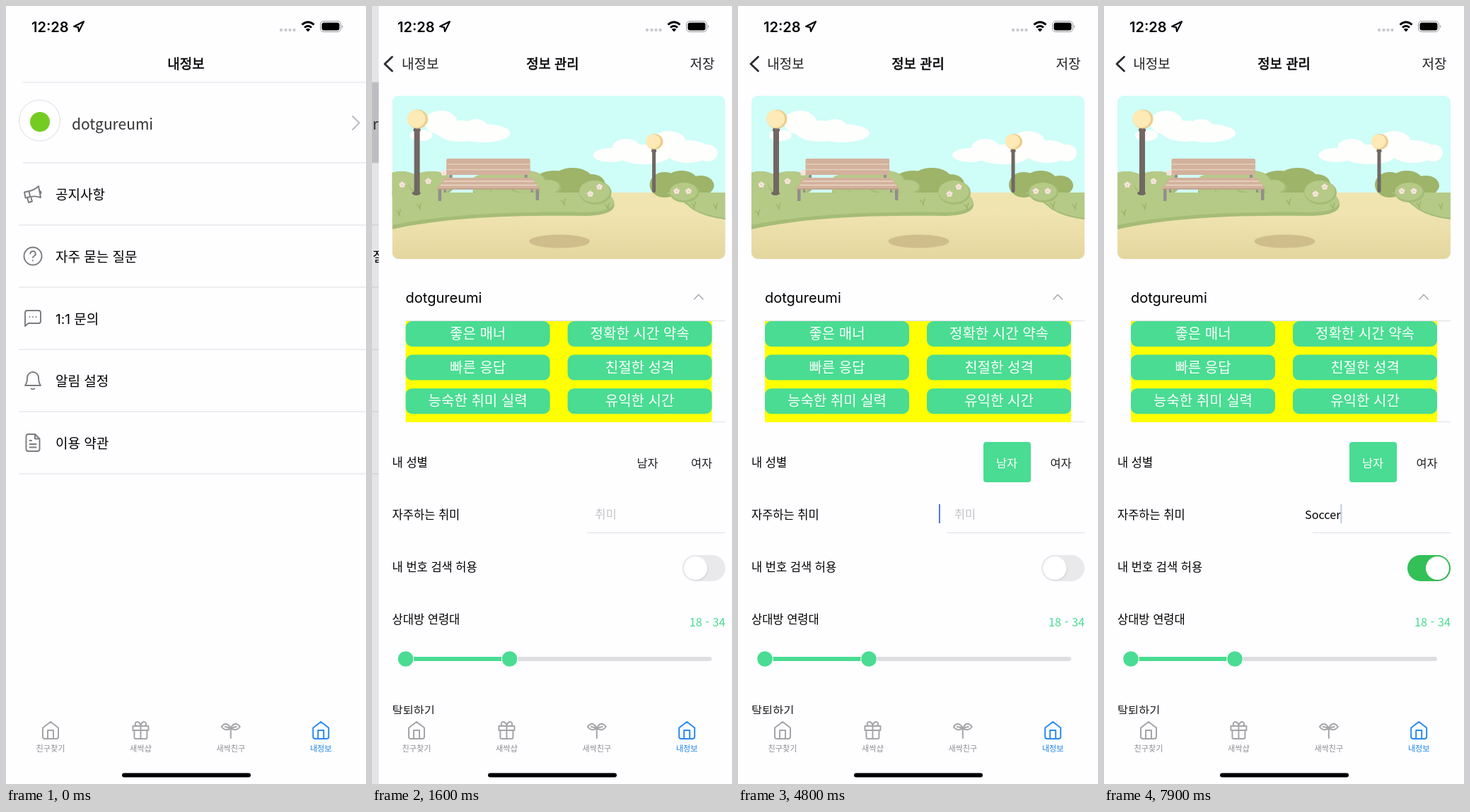
An HTML page for the animation above (8 s loop, 509x1101 px).

```html
<!DOCTYPE html>
<html lang="ko">
<head>
<meta charset="utf-8">
<title>내정보</title>
<style>
  html, body { margin: 0; width: 100%; height: 100%; overflow: hidden; background: #fefdff; }
  svg { display: block; width: 509px; height: 1101px; }
  text { font-family: "Noto Sans CJK KR", "Noto Sans CJK", "Noto Sans", sans-serif; white-space: pre; }
  .latin { font-family: Inter, "Noto Sans CJK KR", "Noto Sans CJK", sans-serif; }
  .medium { stroke: currentColor; stroke-width: .55px; }
  .line { fill: none; stroke-linecap: round; stroke-linejoin: round; }
</style>
</head>
<body>
<svg id="stage" viewBox="0 0 509 1101"></svg>
<script>
const LOOP = 8000, STEP = 100, WIDTH = 509;
const BG = '#fefdff', GREEN = '#49dc92', RULE = '#dfdee2';
const USER = 'dotgureumi';

// Text is placed by its vertical centre.
const text = (x, cy, str, size, attrs = '') =>
  `<text x="${x}" y="${cy + size * 0.38}" font-size="${size}" ${attrs}>${str}</text>`;
const rect = (x, y, w, h, fill, r = 0, attrs = '') =>
  `<rect x="${x}" y="${y}" width="${w}" height="${h}" rx="${r}" fill="${fill}" ${attrs}/>`;
const oval = (x, y, rx, ry, fill) => `<ellipse cx="${x}" cy="${y}" rx="${rx}" ry="${ry}" fill="${fill}"/>`;
const ovals = (fill, list) => list.map(o => oval(...o, fill)).join('');
const line = (d, stroke, width, attrs = '') =>
  `<path class="line" d="${d}" stroke="${stroke}" stroke-width="${width}" ${attrs}/>`;
const rule = (x1, x2, y) => `<path d="M${x1} ${y}H${x2}" stroke="${RULE}" stroke-width="1.2"/>`;
const icon = (x, y, d, stroke = '#7c7b80', width = 1.9) =>
  line(d, stroke, width, `transform="translate(${x} ${y})"`);
const MID = 'text-anchor="middle"';

const ICONS = {
  horn: 'M-12-2.5-5.5-4C0-5 4-7 8-11L11 5C6 3 1 3-4 4L-10.5 5.5ZM-5.5-4-4 4M-8 5-6 12-1 10.5-3 4M9.5-4.5Q13-3 10.5 0',
  ask: 'M-12.5 0a12.5 12.5 0 1 0 25 0a12.5 12.5 0 1 0-25 0M-3.6-3.4A3.7 3.7 0 1 1 1.6 0Q0 .8 0 2M0 6V6.2',
  chat: 'M-11 11V-8a3 3 0 0 1 3-3H8a3 3 0 0 1 3 3V4a3 3 0 0 1-3 3H-6.5ZM-4.5-2V-1.9M0-2V-1.9M4.5-2V-1.9',
  bell: 'M-11 7H11Q8 3 8-4A8 8 0 0 0-8-4Q-8 3-11 7ZM-2.4 11.5Q0 13.2 2.4 11.5',
  page: 'M3-12H-6.5a3 3 0 0 0-3 3V9a3 3 0 0 0 3 3H6.5a3 3 0 0 0 3-3V-5.5ZM3-12V-5.5H9.5M-4.5-3H-2M-4.5 2H4.5M-4.5 6.5H4.5',
  home: 'M-11-3.5 0-12 11-3.5V9a3 3 0 0 1-3 3H-8a3 3 0 0 1-3-3ZM-4 12V0H4V12',
  gift: 'M-11-6H11V0H-11ZM-9 0V10a2 2 0 0 0 2 2H7a2 2 0 0 0 2-2V0M0-6V12M0-6H-5A3 3 0 1 1-2.5-11Q-.5-10 0-6Q.5-10 2.5-11A3 3 0 1 1 5-6Z',
  sprout: 'M0 11V-2Q-3-10-8-9-11-8-13-5-9 0-5-1-2-1 0-3Q3-10 8-9 11-8 13-5 9 0 5-1 2-1 0-3M-8-5Q-4-5 0-2Q4-5 8-5'
};

function listPage() {
  const rows = [['horn', '공지사항'], ['ask', '자주 묻는 질문'], ['chat', '<tspan class="latin">1:1 </tspan>문의'],
                ['bell', '알림 설정'], ['page', '이용 약관']];
  return rect(0, 0, WIDTH, 1101, BG)
    + rect(0, 108, WIDTH, 114, '#d1d1d6', 0, 'id="pressed"')
    + rule(24, WIDTH, 108) + rule(24, WIDTH, 222)
    + `<circle cx="47.5" cy="162" r="29" fill="#fff" stroke="#dddce0"/>`
    + oval(48, 164, 14, 14, '#74cc22')
    + text(93, 167.5, USER, 21, 'fill="#333"')
    + line('M490 156 499.5 165.5 490 175', '#bab9be', 1.8)
    + rows.map(([name, label], i) => {
        const y = 266 + 88 * i;
        return icon(38, y, ICONS[name]) + text(70, y + 0.4, label, 19) + rule(18, WIDTH, y + 44);
      }).join('');
}

function lamp(x, top, bottom, rx, ry, width) {
  return rect(x - width / 2, top, width, bottom - top, '#716762', 2)
    + rect(x - width / 2 - 1, top + ry, width + 2, 4, '#716762', 1)
    + oval(x + 1, top, rx, ry, '#edcd8c') + oval(x - 1, top - 0.5, rx - 1.5, ry - 1, '#fdeab6');
}

function flower(x, y) {
  return ovals('#fbe3df', [0, 1, 2, 3, 4].map(i =>
    [x + 2.6 * Math.sin(i * 1.257), y - 2.6 * Math.cos(i * 1.257), 1.9, 1.9]));
}

function park() {
  const light = '#b4ca86', dark = '#9db469', shade = '#a5bc77', wood = '#d3b19c', metal = '#938d8d';
  const bush = (x, y, rx, ry) => oval(x, y, rx, ry, shade) + oval(x - 1, y - 1.5, rx - 1.5, ry - 1.5, light);
  const tuft = (x, y) => line(`M${x - 4} ${y - 4}Q${x} ${y} ${x} ${y + 3}Q${x} ${y - 3} ${x + 2} ${y - 6}`, dark, 1.4);
  return '<g clip-path="url(#photo)">'
    + rect(19, 127, 471, 231, '#cffdf8')
    + ovals('#fefefc', [[60, 183, 16, 8], [88, 165, 23, 17], [115, 177, 34, 15], [147, 180, 39, 13], [137, 172, 17, 12],
        [328, 211, 25, 10], [350, 201, 20, 13], [375, 210, 38, 14], [410, 192, 24, 15], [437, 206, 32, 16], [465, 208, 14, 12]])
    + rect(19, 264, 471, 94, 'url(#sand)')
    + ovals(dark, [[248, 250, 29, 17], [274, 247, 29, 18], [300, 252, 20, 14], [404, 253, 21, 18], [428, 250, 24, 17], [455, 254, 19, 14]])
    + bush(32, 253, 29, 19) + bush(75, 252, 33, 18) + bush(152, 254, 24, 16) + bush(180, 254, 25, 20)
    + bush(209, 250, 28, 17) + bush(240, 257, 18, 11)
    + `<path d="M19 264H320Q334 270 333 283Q330 296 294 297C200 296 100 298 19 316Z" fill="${shade}"/>`
    + `<path d="M19 264H320Q333 270 332 280Q326 292 290 292C200 291 105 293 19 310Z" fill="${light}"/>`
    + rect(107, 256, 26, 8, '#cffdf8')
    + `<path d="M406 264H490V302Q462 299 444 288Q426 270 406 264Z" fill="${light}"/>`
    + line('M490 301Q462 298 444 287Q432 276 418 269', shade, 2)
    + bush(306, 264, 23, 17) + bush(432, 264, 21, 14)
    + [[33, 253], [70, 248], [92, 236], [312, 256], [299, 266], [421, 262], [438, 262]].map(p => flower(...p)).join('')
    + [[29, 294], [58, 285], [262, 279], [324, 285], [446, 283], [477, 285]].map(p => tuft(...p)).join('')
    + oval(255.5, 333, 43, 9.5, '#cfbe8b')
    + oval(53, 265, 6, 3, '#716762')
    + lamp(54, 160, 266, 14.5, 13.5, 8) + lamp(389, 192, 264, 12, 11, 5)
    + rect(100, 236, 4, 12, metal) + rect(206, 236, 4, 12, metal)
    + rect(84, 256, 4.5, 20, metal, 1) + rect(222, 256, 4.5, 19, metal, 1)
    + rect(92, 256, 3, 8, metal) + rect(215, 256, 3, 8, metal)
    + rect(95.5, 216, 118.5, 23, wood, 2)
    + `<path d="M93 243H217L228 259H82Z" fill="${wood}"/>`
    + line('M97 224H213M97 231.5H213', '#e4cfbd', 1.3)
    + line('M92 248H219M88 253.5H223', '#ead8c6', 1.5)
    + line('M83 259H227', '#bd9d8c', 1.6)
    + '</g>';
}

function detailPage() {
  const traits = ['좋은 매너', '정확한 시간 약속', '빠른 응답', '친절한 성격', '능숙한 취미 실력', '유익한 시간'];
  const labels = ['내 성별', '자주하는 취미', '내 번호 검색 허용', '상대방 연령대'];
  const knob = x => `<circle cx="${x}" cy="924" r="11.3" fill="${GREEN}" stroke="#fff"/>`;
  return rect(0, 0, WIDTH, 1101, BG)
    + '<g clip-path="url(#scroll)">' + park()
    + text(38, 412, USER, 20, 'class="latin"')
    + line('M446 415 452 408.5 458.5 415', '#aaa9ae', 1.5)
    + rule(38, 490, 445.5) + rule(38, 490, 588.5)
    + rect(38, 446, 433, 143, '#ff0')
    + traits.map((label, i) => {
        const x = 38 + 229 * (i % 2), y = 446 + 47.6 * Math.floor(i / 2);
        return rect(x, y, 204, 36, GREEN, 9) + text(x + 102, y + 17.5, label, 20, `${MID} fill="#fff"`);
      }).join('')
    + labels.map((label, i) => text(19, 646 + 74 * i, label, 16.5)).join('')
    + rect(347, 617, 67, 57, GREEN, 4, 'id="maleBox"')
    + text(380, 647, '남자', 16.4, `id="male" ${MID}`)
    + text(456.5, 647, '여자', 16.4, `${MID} fill="#222"`)
    + text(306, 719, '취미', 16.4, 'id="hint" fill="#c3c2c6"')
    + text(284, 719.5, '', 16.2, 'id="hobby"')
    + rect(284, 705, 1.8, 27, '#3f6fd0', 0, 'id="caret"')
    + rule(295, 490, 745.5)
    + rect(429, 777, 61, 37, '#e9e8ea', 18.5)
    + rect(429, 777, 61, 37, '#33c057', 18.5, 'id="track"')
    + `<g id="thumb">${oval(449.5, 797, 16.5, 16.5, '#0001')}${oval(448, 795.5, 16.5, 16.5, '#fff')}</g>`
    + text(490, 871.5, '18 - 34', 16.3, `text-anchor="end" fill="${GREEN}"`)
    + rect(38, 921, 433, 6, '#dedde0', 3) + rect(38, 921, 147, 6, GREEN, 3) + knob(38) + knob(185)
    + text(19, 997, '탈퇴하기', 16.4, 'fill="#222"')
    + '</g>';
}

function navBar() {
  return `<g id="oldTitle">${text(254.5, 81.5, '내정보', 19, `${MID} class="medium"`)}</g>`
    + `<g id="backLabel">${text(254.5, 81.5, '내정보', 19, `${MID} fill="#222"`)}</g>`
    + `<g id="navItems">${line('M28.5 72 18 82 28.5 92', '#2e2a30', 2.8)}`
    + text(467, 81.5, '저장', 19, `${MID} fill="#222"`) + '</g>'
    + `<g id="newTitle">${text(254.5, 81.5, '정보 관리', 18.8, `${MID} class="medium"`)}</g>`;
}

function chrome() {
  const tabs = [['home', '친구찾기'], ['gift', '새싹샵'], ['sprout', '새싹친구'], ['home', '내정보']];
  return `<text class="latin" x="36" y="36.5" font-size="20" font-weight="600">12:28</text>`
    + line('M96 29 110 22 103 36 102 30Z', '#000', 2)
    + [389, 395.5, 401.5, 407.5].map(x => oval(x, 34, 2.2, 2.2, '#cccace')).join('')
    + line('M418.5 26.5Q427 19 435.5 26.5M422 30.5Q427 26 432 30.5', '#000', 3, 'style="stroke-linecap:butt"')
    + '<path d="M423.8 33Q427 30.5 430.2 33L427 36.5Z"/>'
    + rect(444.5, 21.5, 29, 15, 'none', 4.5, 'stroke="#99989c"')
    + rect(446.5, 23.5, 25, 11, '#000', 3)
    + '<path d="M475 26.5Q477.5 29 475 31.5Z" fill="#99989c"/>'
    + tabs.map(([name, label], i) => {
        const x = 63 + 127.4 * i, active = i === 3;
        return icon(x, 1025, ICONS[name], active ? '#2a8bf2' : '#a5a4a9', 2)
          + text(x, 1051, label, 11.1, `${MID} fill="${active ? '#1f86f0' : '#8e8d92'}" ${active ? 'font-weight="500"' : ''}`);
      }).join('')
    + rect(164, 1085.5, 182, 6, '#000', 3);
}

const stage = document.getElementById('stage');
stage.innerHTML = `<defs>
    <clipPath id="photo">${rect(19, 127, 471, 231, '#000', 9)}</clipPath>
    <clipPath id="scroll">${rect(0, 0, WIDTH, 1002, '#000')}</clipPath>
    <linearGradient id="sand" x2="0" y2="1">
      <stop offset=".3" stop-color="#f0e4b1"/><stop offset="1" stop-color="#e4d69e"/>
    </linearGradient></defs>
  <g id="list">${listPage()}</g>
  ${rect(0, 0, WIDTH, 1101, '#000', 0, 'id="dim"')}
  <g id="detail">${detailPage()}</g>${navBar()}${chrome()}`;

const el = Object.fromEntries([...stage.querySelectorAll('[id]')].map(node => [node.id, node]));
const shift = (node, x) => node.setAttribute('transform', `translate(${x} 0)`);
const fade = (node, alpha) => node.setAttribute('opacity', alpha);

const PUSH = 1300, SELECT = 2900, FOCUS = 3800, TYPE = 5600, TOGGLE = 7400;
const PAGE_X = [475, 197, 48, 9.6, 2, 0];
const NAV_LEFT = [0.95, 0.44, 0.07, 0.004, 0, 0];
const BLINK = [0.65, 0.25, 0, 0.08, 0.38, 1, 1, 1, 1];
const SWITCH = [0.15, 0.6, 0.92, 1];

// Value of a table started at a given time, holding its last entry.
const at = (table, t, start, before) =>
  t < start ? before : table[Math.min(table.length - 1, (t - start) / STEP)];

function caretAlpha(t) {
  if (t < FOCUS) return 0;
  const blinkFrom = t < TYPE ? 4300 : 6600;
  return t < blinkFrom ? 1 : BLINK[((t - blinkFrom) / STEP) % BLINK.length];
}

function draw(t) {
  const x = at(PAGE_X, t, PUSH, WIDTH), left = at(NAV_LEFT, t, PUSH, 1);
  shift(el.detail, x);
  shift(el.list, (x - WIDTH) * 0.3);
  fade(el.dim, 0.1 * (1 - x / WIDTH));
  fade(el.pressed, t < PUSH ? 0 : 1);

  shift(el.oldTitle, -187 * (1 - left));
  shift(el.backLabel, -187 * (1 - left));
  shift(el.newTitle, 223 * left);
  fade(el.oldTitle, left);
  for (const node of [el.backLabel, el.navItems, el.newTitle]) fade(node, 1 - left);

  const chosen = t >= SELECT;
  fade(el.maleBox, chosen ? 1 : 0);
  el.male.setAttribute('fill', chosen ? '#fff' : '#222');

  const typed = 'Soccer'.slice(0, t < TYPE ? 0 : (t - TYPE) / STEP + 1);
  el.hobby.textContent = typed;
  fade(el.hint, typed ? 0 : 1);
  shift(el.caret, typed ? el.hobby.getComputedTextLength() : 0);
  fade(el.caret, caretAlpha(t));

  const on = at(SWITCH, t, TOGGLE, 0);
  fade(el.track, on);
  shift(el.thumb, 23.5 * on);
}

const begin = performance.now();
let shown = -1;
function tick() {
  const t = Math.floor(((performance.now() - begin) % LOOP) / STEP) * STEP;
  if (t !== shown) draw(shown = t);
  requestAnimationFrame(tick);
}
tick();
</script>
</body>
</html>
```
